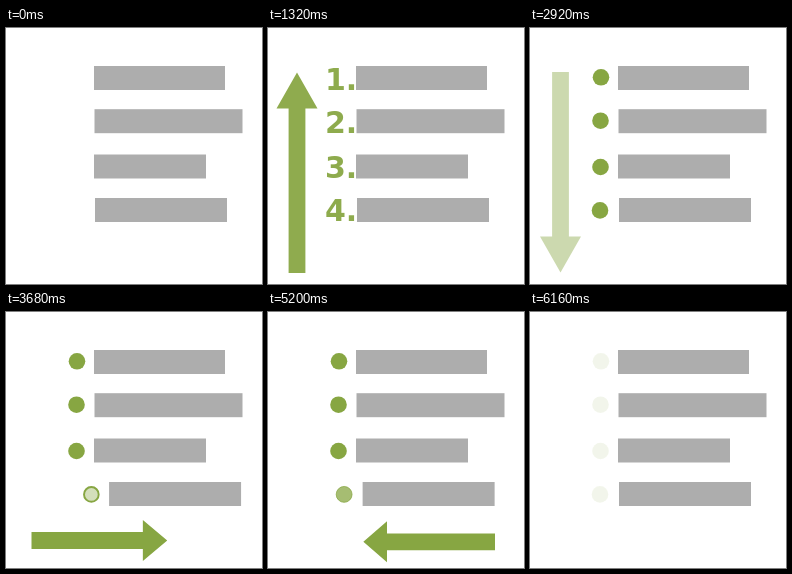
An HTML page for the animation above (6.2 s loop, 256 by 256 pixels).

```html
<!DOCTYPE html>
<html lang="en">
<head>
<meta charset="utf-8">
<title>List levels</title>
<style>
  html, body { margin: 0; width: 100%; height: 100%; overflow: hidden; background: #fff; }
  svg { display: block; width: 100vw; height: 100vh; }
  .bars { fill: #adadad; }
  .green { fill: #87a642; }
  text { font: bold 30px "DejaVu Sans", Verdana, sans-serif; }
</style>
</head>
<body>
<svg viewBox="0 0 256 256">
  <defs>
    <path id="arrow" d="M0-8.4H164.500V-20.500L200.500 0L164.500 20.500V8.400H0Z"/>
  </defs>
  <g class="bars">
    <rect x="88" y="38" width="131" height="24"/>
    <rect x="88.500" y="81.200" width="148" height="24"/>
    <rect x="88" y="126.500" width="112" height="24"/>
    <rect id="bar" x="89" y="170" width="132" height="24"/>
  </g>
  <g id="numbers" class="green">
    <text x="57" y="62">1.</text>
    <text x="57" y="105">2.</text>
    <text x="57" y="150">3.</text>
    <text x="57" y="193">4.</text>
  </g>
  <g id="bullets" class="green">
    <circle cx="71" cy="49.300" r="8.300"/>
    <circle cx="70.500" cy="92.700" r="8.300"/>
    <circle cx="70.500" cy="139" r="8.300"/>
    <circle id="dot" cx="70" cy="182.400" r="8.300" stroke="#87a642"/>
  </g>
  <g id="arrows" class="green"></g>
</svg>
<script>
const LOOP = 6200, STEP = 40;
const $ = id => document.getElementById(id);

// base point, angle, growth start and end, fade start and end
const ARROWS = [
  { x: 29, y: 245, turn: -90, grow: [0, 980], fade: [1300, 1600] },
  { x: 30.5, y: 44, turn: 90, grow: [1640, 2610], fade: [2770, 3030] },
  { x: 25.5, y: 228.5, turn: 0, grow: [3020, 3995], fade: [4240, 4540] },
  { x: 227, y: 229.8, turn: 180, grow: [4550, 5540], fade: [5800, 6100] }
];

for (const a of ARROWS) {
  a.el = document.createElementNS("http://www.w3.org/2000/svg", "use");
  a.el.setAttribute("href", "#arrow");
  $("arrows").append(a.el);
}

const ramp = (t, [from, to]) => Math.min(1, Math.max(0, (t - from) / (to - from)));
const pulse = (t, up, down) => ramp(t, up) * (1 - ramp(t, down));

function draw(t) {
  for (const a of ARROWS) {
    const size = ramp(t, a.grow);
    const alpha = size ? 1 - ramp(t, a.fade) : 0;
    a.el.setAttribute("transform", `translate(${a.x} ${a.y}) rotate(${a.turn}) scale(${size} 1)`);
    a.el.setAttribute("opacity", alpha);
  }

  $("numbers").setAttribute("opacity", pulse(t, [0, 980], [1300, 1640]));
  $("bullets").setAttribute("opacity", pulse(t, [1600, 2400], [5800, 6200]));

  // indent of the last item: it slides right and its bullet hollows out
  const indent = pulse(t, [3040, 4040], [4500, 5440]);
  const ring = 3 * indent;
  $("bar").setAttribute("transform", `translate(${22 * indent} 0)`);
  const dot = $("dot");
  dot.setAttribute("transform", `translate(${24 * indent} 0)`);
  dot.setAttribute("r", 8.3 - ring / 2);
  dot.setAttribute("stroke-width", ring);
  dot.setAttribute("fill-opacity", 1 - indent);
}

const start = performance.now();
function tick() {
  const t = (performance.now() - start) % LOOP;
  draw(Math.floor(t / STEP) * STEP);
  requestAnimationFrame(tick);
}
tick();
</script>
</body>
</html>
```
